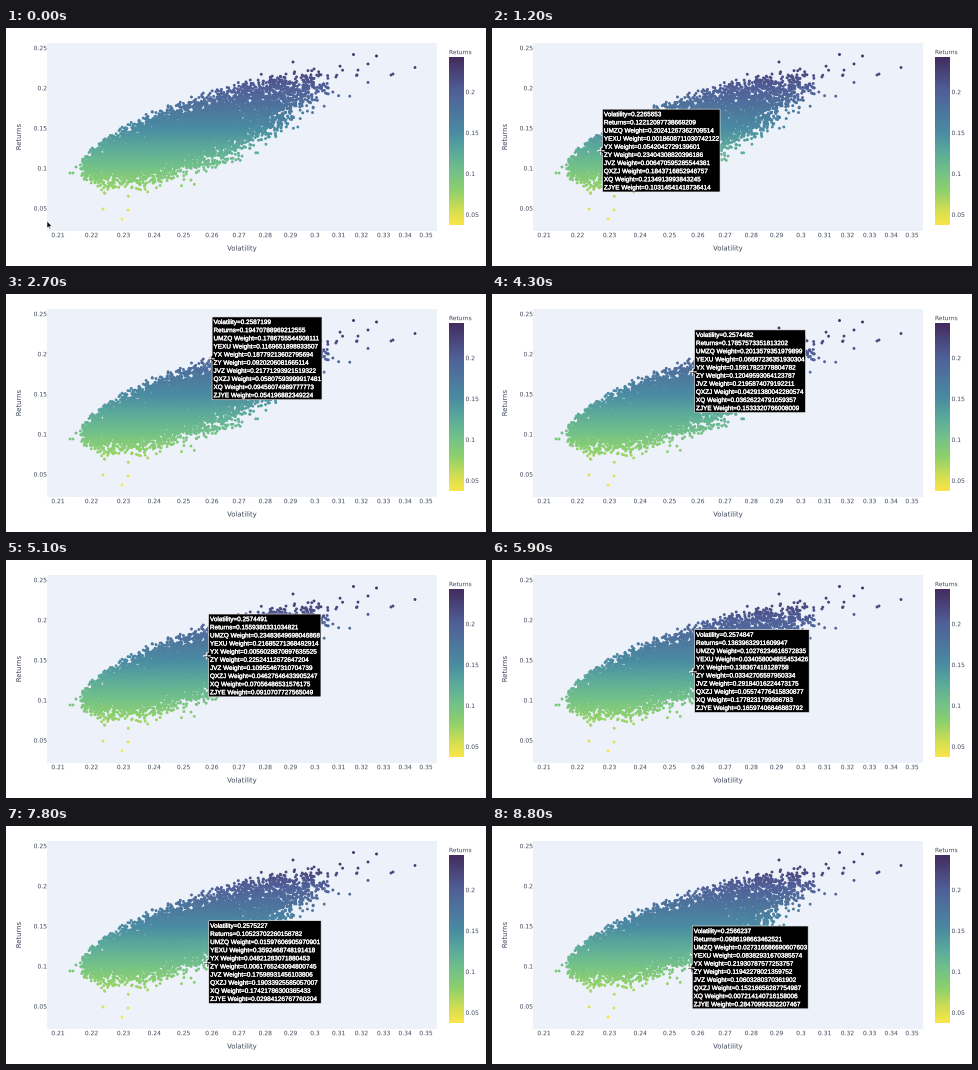
Animation of 480 by 238 pixels, one loop 8.9 s. Source, as a matplotlib script:

```python
import numpy as np
import matplotlib.pyplot as plt
from matplotlib.animation import FuncAnimation
from matplotlib.colors import LinearSegmentedColormap
from matplotlib.patches import Polygon, Rectangle
from matplotlib.patheffects import Normal, withStroke

W, H, DPI = 480, 238, 64
STEP, FRAMES = 100, 89
PT = 72 / DPI
INK = "#3d465a"
LINE_H = 8.13
TICKERS = ["UMZQ", "YEXU", "YX", "ZY", "JVZ", "QXZJ", "XQ", "ZJYE"]
NAMES = ["Volatility", "Returns"] + [f"{name} Weight" for name in TICKERS]

# Where the cursor rests: start ms, end ms, volatility, return
STOPS = [
    (1500, 1800, 0.2330254, 0.1475731195178129),
    (2700, 2900, 0.2587199, 0.19470788969212555),
    (4000, 4500, 0.2574482, 0.17857573351813202),
    (5600, 6000, 0.2574847, 0.13639632911609947),
    (6700, 7100, 0.2577209, 0.11399732752369239),
    (8300, 8900, 0.2566237, 0.0986198663462521),
]

plt.rcParams["text.hinting"] = "none"
plt.rcParams["toolbar"] = "None"


def to_x(vol):
    return 52 + 720.4 * np.log(vol / 0.21)


def to_vol(x):
    return 0.21 * np.exp((x - 52) / 720.4)


def to_y(ret):
    return 20 + (0.25 - ret) * 802


def to_ret(y):
    return 0.25 - (y - 20) / 802


def make_cloud(n=8500):
    """A bent ellipse with a crisp upper and a ragged lower edge, plus outliers."""
    rng = np.random.default_rng(12)
    u = rng.beta(1.8, 2.6, n)
    half = 4 + 79 * np.sqrt(u * (1 - u))
    mid = 140 - 55 * u - 32 * u ** 2
    y = mid + half * (2 * rng.beta(2.6, 3.2, n) - 1) + rng.exponential(2.2, n)
    body = np.column_stack([74 + 250 * u, y])
    far = 296 + rng.exponential(22, 60).clip(0, 66)
    tail = np.column_stack([far, 62 - 0.2 * (far - 296) + rng.normal(0, 9, 60)])
    lone = [(64, 145), (67, 145), (70, 139), (97, 181), (116, 191), (122, 182),
            (287, 34), (347.5, 26.5), (370.5, 28), (409, 39.5), (385, 47), (387, 46)]
    return np.vstack([body, tail, lone])


cloud = make_cloud()
cmap = LinearSegmentedColormap.from_list("returns", [
    (0, "#f9e54a"), (0.07, "#dbe04f"), (0.2, "#8fd16b"), (0.31, "#74c288"),
    (0.43, "#5cab9a"), (0.55, "#4a8ca2"), (0.8, "#505f98"), (1, "#432c5e")])

# Cursor path through the stops
path = [(0, 41, 193), (200, 41, 193)]
for start, end, vol, ret in STOPS:
    path += [(t, to_x(vol), to_y(ret)) for t in (start, end)]
PATH_T, PATH_X, PATH_Y = np.array(path).T

fig = plt.figure(figsize=(W / DPI, H / DPI), dpi=DPI, facecolor="white")
ax = fig.add_axes([0, 0, 1, 1])
ax.axis("off")


def label(x, y, text, size=6, ha="center", color=INK, font="DejaVu Sans",
          effect=Normal(), **kw):
    return ax.text(x, y + 0.365 * size, text, fontsize=size * PT, ha=ha,
                   va="baseline", color=color, family=font,
                   path_effects=[effect], **kw)


ax.add_patch(Rectangle((41, 15), 390, 187.5, fc="#ecf1fa", lw=0))
ax.imshow(np.linspace(1, 0, 256)[:, None], cmap=cmap, aspect="auto",
          extent=(443, 458, 197.5, 30))
ax.scatter(*cloud.T, s=(2.9 * PT) ** 2, c=to_ret(cloud[:, 1]), cmap=cmap,
           vmin=0.0378, vmax=0.241, lw=0)
ax.set_xlim(0, W)
ax.set_ylim(H, 0)

for i in range(21, 36):
    label(to_x(i / 100), 207, f"{i / 100:g}")
for i in range(1, 6):
    ret = i / 20
    label(41, to_y(ret), f"{ret:g}", ha="right")
    if i < 5:
        label(459.5, 64 + (0.2 - ret) * 818, f"{ret:g}", ha="left")
label(236, 220, "Volatility", 6.85)
label(443, 24, "Returns", 5.9, ha="left")
label(13, 109 - 0.365 * 6.85, "Returns", 6.85, rotation=90).set_va("center")

box = ax.add_patch(Polygon([(0, 0)] * 3, fc="black", ec="#f5f0f2", lw=0.6 * PT, zorder=5))
bold = withStroke(linewidth=0.3 * PT, foreground="white")
lines = [label(0, 0, "", 6.4, "left", "white", "Liberation Sans", bold, zorder=6)
         for _ in NAMES]
ARROW = np.array([(0, 0), (0, 7.2), (1.6, 5.8), (2.7, 8.2), (3.7, 7.8),
                  (2.7, 5.4), (4.8, 5.2)])
pointer = ax.add_patch(Polygon(ARROW, fc="black", ec="white", lw=0.6 * PT, zorder=8))
cross = [ax.plot([], [], color=color, lw=lw * PT, zorder=7)[0]
         for color, lw in (("white", 1.5), ("#333333", 0.6))]
tip = [box, *lines, *cross]


def hovered(t, x, y):
    """Volatility and return of the point under the cursor."""
    for start, end, vol, ret in STOPS:
        if start <= t <= end:
            return vol, ret
    px, py = cloud[np.argmin(np.hypot(*(cloud - (x, y)).T))]
    return to_vol(px), to_ret(py)


def show_tip(vol, ret):
    x, y = to_x(vol), to_y(ret)
    weights = np.random.default_rng(int(vol * 1e7)).random(len(TICKERS))
    values = [f"{vol:.7f}"] + [repr(float(v)) for v in (ret, *weights / weights.sum())]
    for i, (line, name, value) in enumerate(zip(lines, NAMES, values)):
        line.set_text(f"{name}={value}")
        line.set_position((x + 5.2, y + (i - 4.5) * LINE_H + 2.3))
    width = max(line.get_window_extent().width for line in lines)
    left, right = x + 3.8, x + 6.6 + width
    top, bottom = y - 41.4, y + 41.4
    box.set_xy([(x, y), (left, y - 3), (left, top), (right, top),
                (right, bottom), (left, bottom), (left, y + 3)])
    cx, cy = x + 2.5, y + 0.5
    for c in cross:
        c.set_data([cx - 3, cx + 3, np.nan, cx, cx], [cy, cy, np.nan, cy - 3, cy + 3])


def update(frame):
    t = frame * STEP
    x, y = np.interp(t, PATH_T, PATH_X), np.interp(t, PATH_T, PATH_Y)
    inside = bool(x > 80)
    for artist in tip:
        artist.set_visible(inside)
    pointer.set_visible(not inside)
    pointer.set_xy(ARROW + (x, y))
    if inside:
        show_tip(*hovered(t, x, y))
    return [*tip, pointer]


anim = FuncAnimation(fig, update, frames=FRAMES, interval=STEP, repeat=True,
                     repeat_delay=0, blit=False)
plt.show()
```
